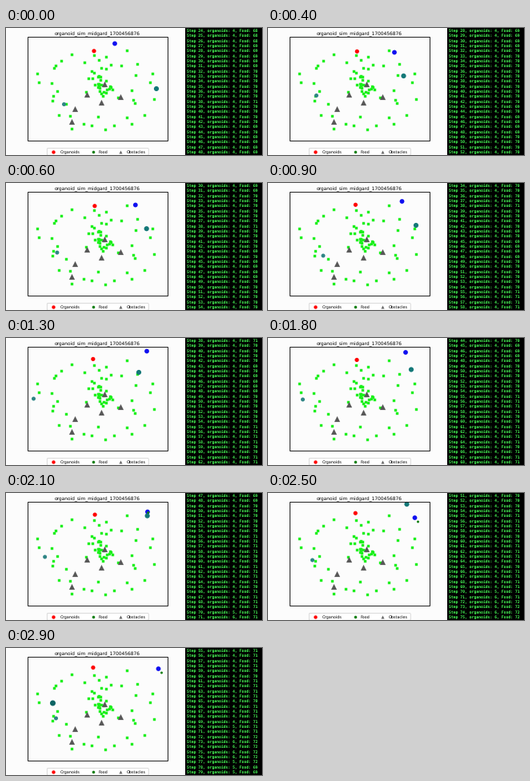
A matplotlib script for the animation above (3000 ms loop, 320 by 159 pixels).

```python
import numpy as np
import matplotlib.pyplot as plt
from matplotlib.animation import FuncAnimation
from matplotlib.patches import Circle, FancyBboxPatch, Rectangle

W, H, DPI = 320, 159, 100
FRAMES, INTERVAL = 30, 100
PT = 72 / DPI  # points per pixel

LIME, GREEN, GRAY = "#1cf01c", "#128012", "#585858"
TEAL, DARK_TEAL, PALE_TEAL = "#147878", "#0c6464", "#2f8585"

plt.rcParams["text.hinting"] = "no_hinting"
plt.rcParams["font.family"] = "DejaVu Sans"

fig = plt.figure(figsize=(W / DPI, H / DPI), dpi=DPI, facecolor="#fcfcfc")
ax = fig.add_axes([0, 0, 1, 1])
ax.set_xlim(0, W)
ax.set_ylim(H, 0)
ax.axis("off")


def label(x, y, text, px, **kw):
    return ax.text(x, y, text, fontsize=px * PT, va="baseline", zorder=6, **kw)


def markers(x, y, shape, px, color, z):
    ax.scatter(x, y, s=(px * PT) ** 2, marker=shape, c=color, linewidths=0,
               zorder=z, snap=False)


# Food: a loose ring over the field around a dense patch
rng = np.random.default_rng(7)
RING, PATCH = 37, 32
angle = 2 * np.pi * (np.arange(RING) + rng.uniform(-0.5, 0.5, RING)) / RING
reach = rng.uniform(0.55, 1, RING)
markers(113 + 80 * reach * np.cos(angle), 77 + 57 * reach * np.sin(angle),
        "s", 3.4, LIME, 2)
markers(rng.normal(119, 9.5, PATCH), rng.normal(72, 10.5, PATCH), "s", 3.4, LIME, 2)

# Obstacles
markers([123.3, 100.7, 143.4, 119, 86, 81.5], [70, 83, 86, 93.3, 101, 117],
        "^", 7.2, GRAY, 4)

# Plot frame and title
ax.add_patch(Rectangle((27.5, 11.5), 175, 130, fill=False, ec="#222222",
                       lw=PT, zorder=5, snap=False))
label(114.5, 8.5, "organoid_sim_midgard_1700456876", 5.88, ha="center")

# Legend
ax.add_patch(FancyBboxPatch((52, 151.3), 125.5, 7.2, fc="white", ec="#cccccc",
                            boxstyle="round,pad=0.7,rounding_size=1", lw=0.7 * PT))
for x, gap, shape, px, color, text in [
    (59, 8.5, "o", 4.4, "red", "Organoids"),
    (108.8, 7, "o", 3.6, GREEN, "Food"),
    (143, 8, "^", 4, "#686868", "Obstacles"),
]:
    markers(x, 155, shape, px, color, 6)
    label(x + gap, 157, text, 4.9)

# Terminal
ROWS, PITCH = 25, 6.33
ax.add_patch(Rectangle((224, -1), W - 223, H + 2, color="black", lw=0, zorder=1))
rows = [
    label(225.7, 5 + PITCH * i, "", 4.76, color="#48ff58", weight="bold",
          family="DejaVu Sans Mono")
    for i in range(ROWS)
]

MEALS = np.array([39, 43, 45, 59, 65, 78, 78, 78, 78])


def food(step):
    """Food grows back at a steady rate and shrinks with every meal."""
    grown = int(np.floor((step - 26.2) / 5.65)) + 1
    return 68 + grown - np.count_nonzero(MEALS <= step)


def population(step):
    """Two births, then one death."""
    return 4 + (step >= 70) + (step >= 71) - (step >= 77)


def disc(color, radius):
    return ax.add_patch(Circle((0, 0), radius, fc=color, lw=0, zorder=3))


red, blue, teal = disc("red", 2.6), disc("#1010f0", 2.9), disc(TEAL, 3.1)
blue_child, pale_child = disc(GREEN, 1.5), disc(DARK_TEAL, 1.5)
pale = disc(PALE_TEAL, 2.5)
discs = [red, blue, teal, blue_child, pale_child, pale]

# Turning points of the three wanderers, at shared times
TURNS = [0, 4, 9, 13, 18, 25, 29]
WANDERERS = {
    blue: ([136, 158, 167.5, 176, 172, 183.5, 190.5], [19.5, 30.5, 23, 16.5, 18, 31, 26]),
    teal: ([188, 169.5, 185, 166, 179, 173.5, 171], [76, 60, 53, 43, 39.5, 14, 14]),
    pale: ([72.5, 60.5, 69, 34.5, 43.5, 55.5, 62.5], [95.5, 84.5, 91, 76, 77, 84, 88]),
}


def draw(i):
    sway = np.sin(0.4 * i)
    red.center = 110 + 1.3 * sway, 28.8 - 0.12 * i + sway
    for body, (xs, ys) in WANDERERS.items():
        body.center = np.interp(i, TURNS, xs), np.interp(i, TURNS, ys)
    teal.set_visible(i < 27)

    # Each child starts at its parent and drifts away
    x, y = blue.center
    drift = np.clip((i - 20) / 5, 0, 1)
    blue_child.center = x + 4 * drift, y + 5 * drift
    blue_child.set_visible(i >= 20)

    x, y = pale.center
    drift = np.clip((i - 25) / 4, 0, 1)
    pale_child.center = x - 4 * drift, y - 19 * drift
    pale_child.radius = 1.5 + 2 * drift
    pale_child.set_visible(i >= 21)

    # The log now and then advances by two lines
    first = 24 + i + (i >= 7) + (i >= 16)
    for step, row in enumerate(rows, first):
        row.set_text(f"Step {step}, organoids: {population(step)}, Food: {food(step)}")
    return rows + discs


anim = FuncAnimation(fig, draw, frames=FRAMES, interval=INTERVAL,
                     init_func=lambda: draw(0), repeat=True, repeat_delay=0)
plt.show()
```
